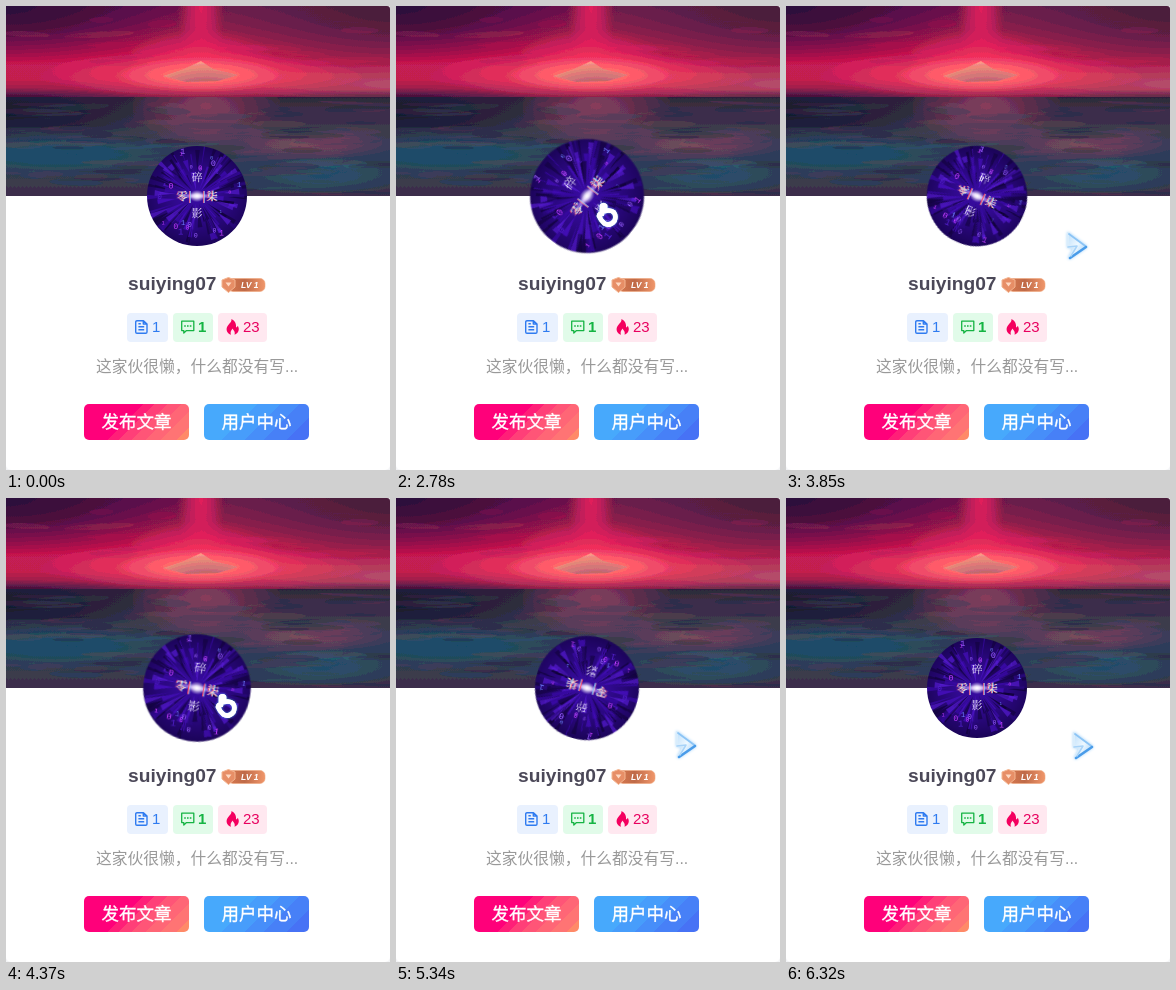
These frames come from a looping animation (384 px wide and 464 px high, 7.01 s). An HTML page with a canvas:

```html
<!DOCTYPE html>
<html lang="zh-CN">
<head>
<meta charset="utf-8">
<title>用户卡片</title>
<style>
html, body { margin: 0; width: 100%; height: 100%; overflow: hidden; background: #f3f4f6; }
body { font-family: "Liberation Sans", "Noto Sans CJK SC", "Noto Sans CJK", sans-serif; }
.card { position: absolute; left: 0; top: 0; width: 384px; height: 464px; overflow: hidden; border-radius: 0 3px 5px 5px; background: #fff; }
.card > * { position: absolute; }
.banner { left: 0; top: 0; width: 384px; height: 190px; }
.avatar { left: 141px; top: 140px; width: 100px; height: 100px; border-radius: 50%; animation: spin 7010ms infinite; }
.name { left: 122px; top: 266px; font: bold 19.2px/24px "Liberation Sans", sans-serif; color: #4b4858; white-space: nowrap; }
.badge { left: 213px; top: 268px; }
.chip { top: 307px; height: 29px; border-radius: 4px; font-size: 15px; line-height: 27px; }
.chip span { position: absolute; left: 25px; }
.chip svg { position: absolute; left: 7px; top: 5.5px; }
.bio { left: 90px; top: 349px; font-size: 15.75px; line-height: 24px; color: #999; white-space: nowrap; }
.btn { top: 398px; width: 105px; height: 36px; border-radius: 5px; font-size: 17.5px; line-height: 37px; text-align: center; color: #fff; -webkit-text-stroke: .35px #fff; }
.pink { left: 78px; background: linear-gradient(135deg, #ff007a 42%, #ff1f78 42% 50%, #ff3f78 50% 59%, #ff5577 59% 69%, #ff6676 69% 80%, #ff7474 80% 91%, #ff8a68 91%); }
.blue { left: 198px; background: linear-gradient(135deg, #47a9fc 38%, #479dfb 38% 54%, #478ef9 54% 68%, #4780f7 68% 84%, #4772f5 84%); }
.cursor { left: 0; top: 0; width: 32px; height: 34px; overflow: visible; animation: move 7010ms linear infinite, show 7010ms step-end infinite; }
.hand { animation: hand 7010ms step-end infinite; filter: drop-shadow(0 0 1.2px #5aa5f2); }
.arrow { animation: arrow 7010ms step-end infinite; filter: drop-shadow(0 0 1.5px #a9d5fa); }

@keyframes spin {
  0%, 34.879%, 56.576%, 60.214%, 80.228%, 100% { transform: rotate(0deg) scale(1); animation-timing-function: ease; }
  42.011%, 49.444%, 67.347%, 73.096% { transform: rotate(720deg) scale(1.15); animation-timing-function: ease; }
}
@keyframes move {
  0%, 34.807% { transform: translate(239px, 217px); }
  37.09%, 46.077% { transform: translate(199px, 195px); }
  49.444% { transform: translate(258px, 214px); }
  49.929% { transform: translate(274px, 221px); }
  50.785%, 57.775% { transform: translate(279px, 224px); }
  60.214% { transform: translate(241px, 206px); }
  62.34%, 70.756% { transform: translate(208px, 194px); }
  73.096% { transform: translate(248px, 215px); }
  75.321%, 89.58% { transform: translate(278px, 231px); }
  89.586%, 90.145% { transform: translate(282px, 231px); }
  90.15%, 100% { transform: translate(285px, 232px); }
}
@keyframes show { 0% { opacity: 0; } 34.235%, 100% { opacity: 1; } }
@keyframes hand {
  0%, 60.214% { opacity: 1; }
  49.444%, 73.096%, 100% { opacity: 0; }
}
@keyframes arrow {
  0%, 60.214% { opacity: 0; }
  49.444%, 73.096%, 100% { opacity: 1; }
}
</style>
</head>
<body>
<div class="card">
  <canvas class="banner" width="384" height="190"></canvas>
  <canvas class="avatar" width="200" height="200"></canvas>

  <div class="name">suiying07</div>
  <svg class="badge" width="50" height="22">
    <defs>
      <linearGradient id="copper"><stop stop-color="#d8794f"/><stop offset=".45" stop-color="#bf6a48"/><stop offset="1" stop-color="#f0966a"/></linearGradient>
    </defs>
    <rect x="9" y="4.500" width="37" height="13" rx="5" fill="url(#copper)" stroke="#f0a67c" stroke-width=".6"/>
    <path d="M9.500 3.500l6.500 2.500v7l-6.500 5.500L3 13V6z" fill="#e78e66" stroke="#f3b48f"/>
    <path d="M6.500 8.500h6l-3 4z" fill="#ffd9c2"/>
    <text x="22" y="14" font-size="8.500" font-weight="bold" font-style="italic" fill="#fff" font-family="Liberation Sans, sans-serif">LV 1</text>
  </svg>

  <div class="chip" style="left:121px;width:41px;background:#e9f1fe;color:#2f7bf0">
    <svg width="16" height="16" fill="none" stroke="currentColor" stroke-width="1.4" stroke-linejoin="round">
      <path d="M3 1.7h6.5L13 5v8a1.3 1.3 0 0 1-1.3 1.3H3A1.3 1.3 0 0 1 1.7 13V3A1.3 1.3 0 0 1 3 1.7zM9.3 1.9V5H13M4.4 7.7h5.8M4.4 10.7h5.8M4.4 4.8h2.4"/>
    </svg><span>1</span>
  </div>
  <div class="chip" style="left:167px;width:40px;background:#e1fbe9;color:#15b443">
    <svg width="16" height="16" fill="none" stroke="currentColor" stroke-width="1.3" stroke-linejoin="round">
      <path d="M1.7 2.2h12.1v9.4H6.5l-2.7 2.5v-2.5H1.7z"/>
      <path d="M4.2 7h1.6M7 7h1.6M9.8 7h1.6" stroke-width="1.7"/>
    </svg><span style="font-weight:bold">1</span>
  </div>
  <div class="chip" style="left:212px;width:49px;background:#ffe8f0;color:#e8005f">
    <svg width="16" height="16" fill="#f4005f">
      <path d="M6.4 0C7 3 4 4.500 2.300 7.500.500 11 2.300 14.500 6 15.700 5 13.500 5.800 11.500 7.800 9.500 8 11.300 10.500 12 9.600 15.700 13.500 14.300 15 10.500 12.800 6.800 12.300 8 11.700 8.500 11 8.500 11.500 5 10 1.500 6.400 0z"/>
    </svg><span>23</span>
  </div>

  <div class="bio">这家伙很懒，什么都没有写...</div>
  <div class="btn pink">发布文章</div>
  <div class="btn blue">用户中心</div>

  <svg class="cursor">
    <defs>
      <linearGradient id="ice" x1="0" y1="0" x2="1" y2=".8"><stop stop-color="#bfe0fb"/><stop offset=".55" stop-color="#eef8ff"/><stop offset="1" stop-color="#a9d4f8"/></linearGradient>
    </defs>
    <g class="arrow" fill="none" stroke-linejoin="round" stroke-linecap="round">
      <path d="M3 3L21 16.500 4 28 9 18 3 17z" fill="url(#ice)" stroke="#d9edfc" stroke-width="2"/>
      <path d="M4 4L21 16.500" stroke="#8cc4f5" stroke-width="1.800"/>
      <path d="M21 17L5 28" stroke="#4a9ce9" stroke-width="2.600"/>
      <path d="M3 17L12 16 6 26" stroke="#a8d3f8" stroke-width="1.500"/>
    </g>
    <g class="hand" fill="none" stroke-linejoin="round" stroke-linecap="round">
      <path id="palm" d="M7 13V5Q8.500 3.500 10 5V10Q16 8.500 19 11.500 21.500 15 19.500 20 15 25.500 9.500 22.500 5.500 19 4 15 4.500 12.500 7 13z" stroke="#fff" stroke-width="4.600"/>
      <use href="#palm" stroke="#b9dafa" stroke-width="1"/>
    </g>
  </svg>
</div>

<script>
let seed = 7;
const rnd = (lo = 0, hi = 1) => {
  seed = (seed * 16807) % 2147483647;
  return lo + (hi - lo) * seed / 2147483647;
};
const pick = list => list[Math.floor(rnd(0, list.length))];
const context = name => document.querySelector(name).getContext('2d');

function glow(c, x, y, rx, ry, color) {
  c.save();
  c.translate(x, y);
  c.scale(rx, ry);
  const g = c.createRadialGradient(0, 0, 0, 0, 0, 1);
  g.addColorStop(0, color);
  g.addColorStop(.4, color + 'b0');
  g.addColorStop(1, color + '00');
  c.fillStyle = g;
  c.fillRect(-1, -1, 2, 2);
  c.restore();
}

function fade(c, y0, y1, colors) {
  const g = c.createLinearGradient(0, y0, 0, y1);
  colors.forEach((color, i) => g.addColorStop(i / (colors.length - 1), color));
  c.fillStyle = g;
  c.fillRect(0, y0, 384, y1 - y0);
}

function streaks(c, n, y0, y1, colors) {
  for (let i = 0; i < n; i++) {
    c.fillStyle = pick(colors);
    c.beginPath();
    c.ellipse(rnd(0, 384), rnd(y0, y1), rnd(12, 45), rnd(1, 4), rnd(-.06, .06), 0, 7);
    c.fill();
  }
}

function posterize(c, step) {
  const image = c.getImageData(0, 0, 384, 190);
  image.data.forEach((v, i, d) => { if (i % 4 < 3) d[i] = Math.round(v / step) * step; });
  c.putImageData(image, 0, 0);
}

function drawSky(c) {
  fade(c, 0, 92, ['#70154b', '#8c174e', '#b0164f', '#cc1653', '#c01a52', '#7a1d4a']);
  glow(c, 0, 0, 190, 60, '#2c123c');
  glow(c, 384, 0, 190, 75, '#48203f');
  glow(c, 384, 78, 150, 22, '#b84a66');
  streaks(c, 20, 10, 60, ['#d8105825', '#70154a28', '#e8306022']);
  glow(c, 195, 0, 24, 80, '#e01c5c');
  glow(c, 195, 55, 75, 32, '#ee2c60');
  glow(c, 195, 70, 165, 24, '#ff4a68');
  glow(c, 195, 69, 85, 18, '#ff7472');
  c.fillStyle = '#ff9684';
  c.beginPath();
  c.moveTo(157, 70);
  [[178, 63], [195, 55], [207, 63], [232, 69], [212, 75], [180, 76]].forEach(p => c.lineTo(...p));
  c.fill();
  glow(c, 0, 94, 150, 12, '#35123f');
  glow(c, 384, 95, 130, 12, '#4a2447');
}

function drawSea(c) {
  c.save();
  c.rect(0, 91, 384, 99);
  c.clip();
  fade(c, 91, 190, ['#32253e', '#3b3049', '#3c3b52', '#304258', '#343a52', '#3a3048']);
  glow(c, 0, 108, 150, 32, '#14162f');
  glow(c, 200, 100, 75, 45, '#84385a');
  glow(c, 300, 138, 90, 16, '#7a465c');
  glow(c, 50, 147, 120, 24, '#17506a');
  glow(c, 315, 170, 90, 20, '#24516a');
  streaks(c, 45, 97, 136, ['#1b224048', '#7b3f5a38', '#25405840']);
  streaks(c, 35, 136, 164, ['#14526a50', '#35687e40', '#2b2a4455', '#70405a40']);
  streaks(c, 30, 164, 190, ['#2a263f55', '#60344e38', '#204b6448']);
  c.restore();
}

function drawAvatar(c) {
  c.scale(2, 2);
  c.translate(50, 50);
  c.fillStyle = '#1b0458';
  c.fillRect(-50, -50, 100, 100);
  glow(c, 0, 0, 56, 50, '#3a0ca6');
  for (let i = 0; i < 130; i++) {
    c.save();
    c.rotate(rnd(0, Math.PI * 2));
    const start = rnd(6, 32), end = start + rnd(12, 30), w = rnd(.6, 3.2);
    c.fillStyle = pick(['#3a0aa8b0', '#4a10c4a0', '#5a1cd8a0', '#2a0880b0', '#12033ca0', '#0e0232a0']);
    c.beginPath();
    c.moveTo(start, 0);
    c.lineTo(end, -w);
    c.lineTo(end, w);
    c.fill();
    c.restore();
  }
  c.textAlign = 'center';
  c.textBaseline = 'middle';
  for (let i = 0; i < 24; i++) {
    const a = rnd(0, 6.28), r = rnd(26, 47);
    c.font = `${rnd(4, 9)}px "Liberation Mono", monospace`;
    c.fillStyle = pick(['#9a60ff', '#c33cff', '#6d7cff', '#5420d0']);
    c.fillText(pick(['0', '1']), r * Math.cos(a), r * Math.sin(a));
  }
  glow(c, 0, 0, 22, 3, '#c7a0ff');
  glow(c, 0, 0, 8, 6, '#ffffff');

  const word = (text, x, y, color) => {
    c.fillStyle = color;
    c.fillText(text, x, y);
  };
  c.font = '11px "Noto Serif CJK SC", "Noto Sans CJK SC", "Noto Sans CJK", serif';
  word('碎', 0, -19, '#f4f0ff');
  word('影', 0, 17, '#f4f0ff');
  for (const [text, x] of [['零', -15], ['柒', 15], ['|', -7], ['|', 7]]) {
    word(text, x - .7, 0, '#ff4a6a');
    word(text, x + .6, 0, '#6fd0ff');
    word(text, x, 0, '#ffd9d4');
  }
}

const banner = context('.banner');
drawSky(banner);
drawSea(banner);
posterize(banner, 15);
drawAvatar(context('.avatar'));
</script>
</body>
</html>
```
